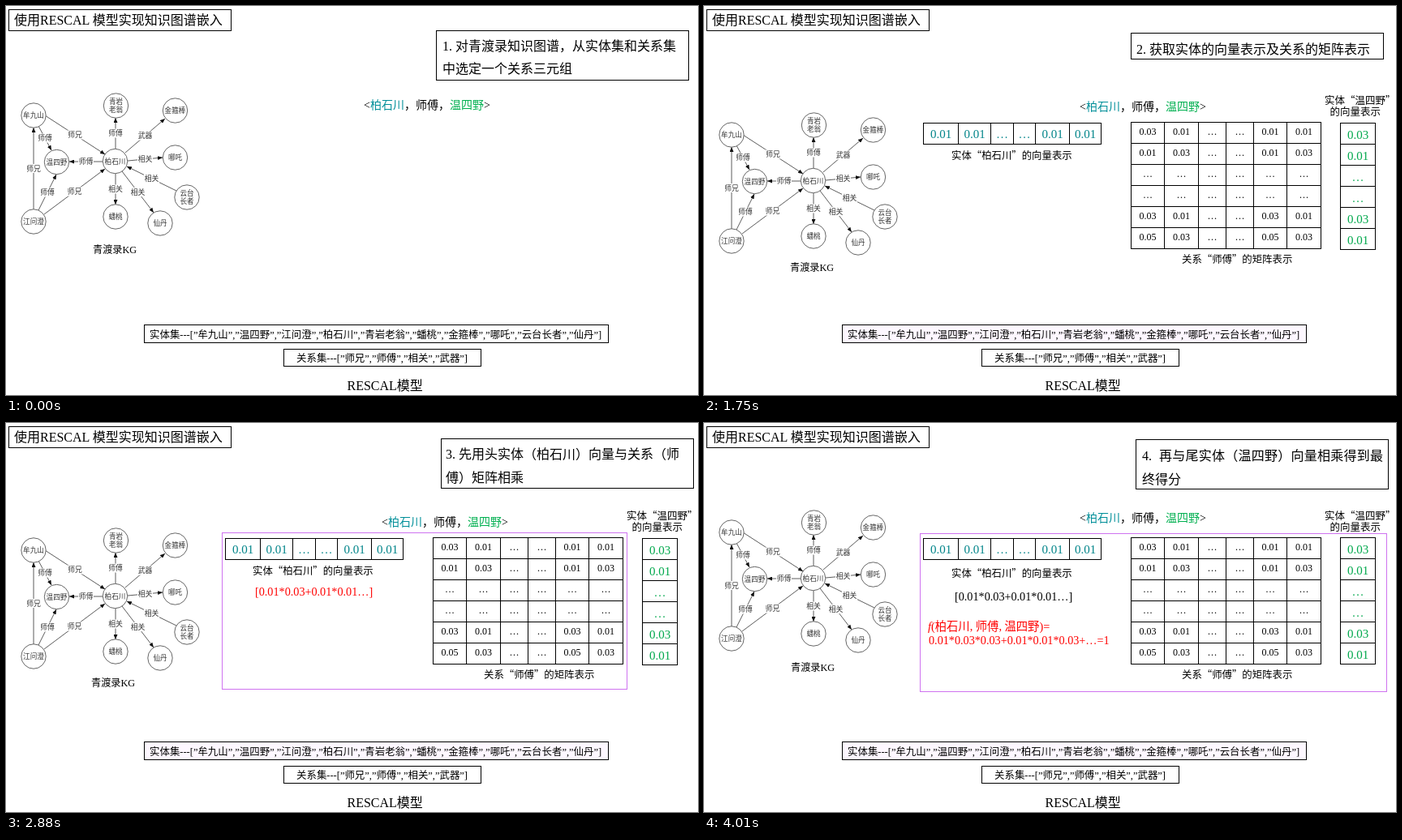
An HTML page that plays this animation: 853x480 px, repeating every 4460 ms.

```html
<!DOCTYPE html>
<html lang="zh-CN">
<head>
<meta charset="utf-8">
<title>RESCAL 模型</title>
<style>
  html, body { margin: 0; width: 100%; height: 100%; overflow: hidden; background: #fff; }
  svg { display: block; }
  text { font-family: 'Liberation Serif', 'Noto Sans CJK SC', 'Noto Sans CJK', serif; white-space: pre; }
  text.cjk { font-family: 'Noto Sans CJK SC', 'Noto Sans CJK', sans-serif; }
</style>
</head>
<body>
<svg id="stage" xmlns="http://www.w3.org/2000/svg" width="853" height="480" viewBox="0 0 853 480">
  <defs>
    <marker id="tip" viewBox="0 0 6 5" refX="6" refY="2.5" markerWidth="6" markerHeight="5"
            markerUnits="userSpaceOnUse" orient="auto"><path d="M0 0L6 2.5L0 5z" fill="#111"/></marker>
  </defs>
</svg>
<script>
const NS = 'http://www.w3.org/2000/svg';
const TEAL = '#008489', GREEN = '#00a84c', RED = '#ff0000', PURPLE = '#cf73f0';
const HEAD = '柏石川', TAIL = '温四野', PIG = '牟九山', SAND = '江问澄';
const SAGE = '青岩老翁', ELDER = '云台长者', BOOK = '青渡录';

const stage = document.getElementById('stage');

function add(parent, tag, attrs, content) {
  const node = document.createElementNS(NS, tag);
  for (const key in attrs) node.setAttribute(key, attrs[key]);
  if (content !== undefined) node.textContent = content;
  return parent.appendChild(node);
}

// y is the vertical middle of the glyphs
function label(g, x, y, size, content, extra = {}) {
  return add(g, 'text', { x, y: y + size * 0.37, 'font-size': size, fill: '#000', ...extra }, content);
}

function box(g, x1, y1, x2, y2, stroke = '#000', fill = 'none') {
  add(g, 'rect', { x: x1 + 0.5, y: y1 + 0.5, width: x2 - x1, height: y2 - y1, fill, stroke });
}

function grid(g, xs, ys) {
  const [left, right, top, bottom] = [xs[0], xs[xs.length - 1], ys[0], ys[ys.length - 1]];
  const d = xs.map(x => `M${x + 0.5} ${top}V${bottom + 1}`)
    .concat(ys.map(y => `M${left} ${y + 0.5}H${right + 1}`)).join('');
  add(g, 'path', { d, stroke: '#000', fill: 'none' });
}

function fillCells(g, xs, ys, size, color, rows) {
  rows.forEach((row, r) => row.split(' ').forEach((value, c) => {
    add(g, 'text', {
      x: (xs[c] + xs[c + 1]) / 2 + 0.5, y: ys[r], 'font-size': size, fill: color, 'text-anchor': 'middle'
    }, value);
  }));
}

const steps = (start, count, gap) => Array.from({ length: count }, (_, i) => start + i * gap);

const nodes = [
  [34, 135, PIG], [62.5, 192.5, TAIL], [34, 266, SAND], [134.5, 191.5, HEAD], [135.5, 123, SAGE],
  [208.5, 129, '金箍棒'], [208.5, 187, '哪吒'], [223, 236, ELDER], [190, 268, '仙丹'], [135, 260, '蟠桃']
];
// start, end, relation
const edges = [
  [48, 135, 122, 183, '师兄'], [40, 148, 56, 178, '师傅'], [34, 251, 34, 150, '师兄'],
  [40, 252, 62, 208, '师傅'], [47, 257, 122, 201, '师兄'], [119, 192, 78, 192, '师傅'],
  [135, 176, 135, 138, '师傅'], [147, 181, 196, 139, '武器'], [150, 191, 193, 187, '相关'],
  [210, 228, 149, 198, '相关'], [143, 204, 182, 255, '相关'], [135, 207, 135, 245, '相关']
];

function graph(parent, dy) {
  const g = add(parent, 'g', { transform: `translate(0 ${dy})` });
  const mid = { 'text-anchor': 'middle', fill: '#333' };
  for (const [x1, y1, x2, y2, name] of edges) {
    const x = (x1 + x2) / 2, y = (y1 + y2) / 2;
    add(g, 'line', { x1, y1, x2, y2, stroke: '#333', 'stroke-width': 0.8, 'marker-end': 'url(#tip)' });
    add(g, 'rect', { x: x - 9.5, y: y - 5.5, width: 19, height: 11, fill: '#fff' });
    label(g, x, y, 8.8, name, mid);
  }
  for (const [x, y, name] of nodes) {
    add(g, 'circle', { cx: x, cy: y, r: 15.2, fill: '#fff', stroke: '#555', 'stroke-width': 0.9 });
    if (name.length === 4) {
      label(g, x, y - 5.3, 8.6, name.slice(0, 2), mid);
      label(g, x, y + 5.3, 8.6, name.slice(2), mid);
    } else label(g, x, y, 8.6, name, mid);
  }
}

function triple(g, x, y) {
  const t = label(g, x, y, 14, '');
  const parts = [['<'], [HEAD, '#008f99'], ['，师傅，'], [TAIL, '#00b050'], ['>']];
  for (const [s, fill = '#000'] of parts) add(t, 'tspan', { fill }, s);
}

function common(g) {
  const list = items => '[' + items.map(s => `”${s}”`).join(',') + ']';
  box(g, 3, 4, 277, 30);
  label(g, 10, 17, 16, '使用RESCAL 模型实现知识图谱嵌入');
  label(g, 177, 405, 12.45, '实体集---' + list(
    [PIG, TAIL, SAND, HEAD, SAGE, '蟠桃', '金箍棒', '哪吒', ELDER, '仙丹']));
  box(g, 342, 423, 585, 444);
  label(g, 358, 434, 12.45, '关系集---' + list(['师兄', '师傅', '相关', '武器']));
  label(g, 420.5, 468, 16, 'RESCAL模型');
}

function heading(g, [x1, y1, x2, y2], x, lines) {
  box(g, x1, y1, x2, y2);
  for (const [y, s, dx = 0, spacing = 0] of lines) label(g, x + dx, y, 16, s, { 'letter-spacing': spacing });
}

const vectorX = [270, 313, 353, 381, 408, 450, 489];
const matrixX = [526, 567, 609, 643, 677, 718, 760];
const tailX = [784, 827];
const dots = '… … … … … …';

function tables(g, top, capX, capY, tailTop) {
  const cjk = { class: 'cjk' };
  grid(g, vectorX, [top + 1, top + 27]);
  fillCells(g, vectorX, [top + 20], 15, TEAL, ['0.01 0.01 … … 0.01 0.01']);
  label(g, capX, capY, 12.4, `实体“${HEAD}”的向量表示`, cjk);

  grid(g, matrixX, steps(top, 7, 26));
  fillCells(g, matrixX, steps(top + 16, 6, 26), 12, '#000', [
    '0.03 0.01 … … 0.01 0.01', '0.01 0.03 … … 0.01 0.03', dots, dots,
    '0.03 0.01 … … 0.03 0.01', '0.05 0.03 … … 0.05 0.03'
  ]);
  label(g, 589, top + 169.5, 12.4, '关系“师傅”的矩阵表示', cjk);

  grid(g, tailX, steps(tailTop, 7, 26));
  fillCells(g, tailX, steps(tailTop + 19.5, 6, 26), 15, GREEN, ['0.03', '0.01', '…', '…', '0.03', '0.01']);
  label(g, 765, top - 27, 12.5, `实体“${TAIL}”`, cjk);
  label(g, 771.5, top - 13, 12.5, '的向量表示', cjk);
}

const PRODUCT = '[0.01*0.03+0.01*0.01…]';

const scenes = [
  {
    ms: 1070, graphY: 0, name: [107, 300], triple: [441, 122], tint: '#fff',
    draw(g) {
      heading(g, [530, 30, 841, 91], 538, [
        [49, `1. 对${BOOK}知识图谱，从实体集和关系集`], [77, '中选定一个关系三元组']]);
    }
  },
  {
    ms: 1130, graphY: 24, name: [106, 322], triple: [463, 124], tint: '#fdf7ff',
    draw(g) {
      heading(g, [526, 33, 837, 65], 533, [[53, '2. 获取实体的向量表示及关系的矩阵表示']]);
      tables(g, 143, 305, 184.5, 144);
    }
  },
  {
    ms: 1130, graphY: 22, name: [105, 320.5], triple: [463, 122], tint: '#fdf7ff',
    draw(g) {
      heading(g, [536, 19, 847, 80], 542, [
        [38, `3. 先用头实体（${HEAD}）向量与关系（师`], [67, '傅）矩阵相乘']]);
      box(g, 266, 135, 765, 328, PURPLE);
      tables(g, 141, 304, 182.5, 142);
      label(g, 307, 208, 14.2, PRODUCT, { fill: RED });
    }
  },
  {
    ms: 1130, graphY: 0, name: [107, 301], triple: [463, 117], tint: '#fdf7ff',
    draw(g) {
      heading(g, [532, 20, 843, 81], 540, [
        [40, '4.'], [40, `再与尾实体（${TAIL}）向量相乘得到最`, 21, 0.25], [69, '终得分']]);
      box(g, 266, 136, 841, 331, PURPLE);
      tables(g, 141, 305, 185, 141);
      label(g, 309, 214, 14.2, PRODUCT);
      const score = label(g, 276, 250.5, 14.3, '', { fill: RED });
      add(score, 'tspan', { 'font-style': 'italic' }, 'f');
      add(score, 'tspan', {}, `(${HEAD}, 师傅, ${TAIL})=`);
      label(g, 277, 268, 14.2, '0.01*0.03*0.03+0.01*0.01*0.03+…=1', { fill: RED });
    }
  }
];

for (const scene of scenes) {
  const g = scene.group = add(stage, 'g', {});
  box(g, 170, 393, 742, 415, '#000', scene.tint);
  common(g);
  graph(g, scene.graphY);
  label(g, ...scene.name, 12.2, BOOK + 'KG');
  triple(g, ...scene.triple);
  scene.draw(g);
}

const loop = scenes.reduce((sum, s) => sum + s.ms, 0);

function render(time) {
  let left = time % loop;
  const current = scenes.find(s => (left -= s.ms) < 0);
  for (const s of scenes) s.group.style.display = s === current ? '' : 'none';
}

const start = performance.now();
function tick() {
  render(performance.now() - start);
  requestAnimationFrame(tick);
}
tick();
</script>
</body>
</html>
```
